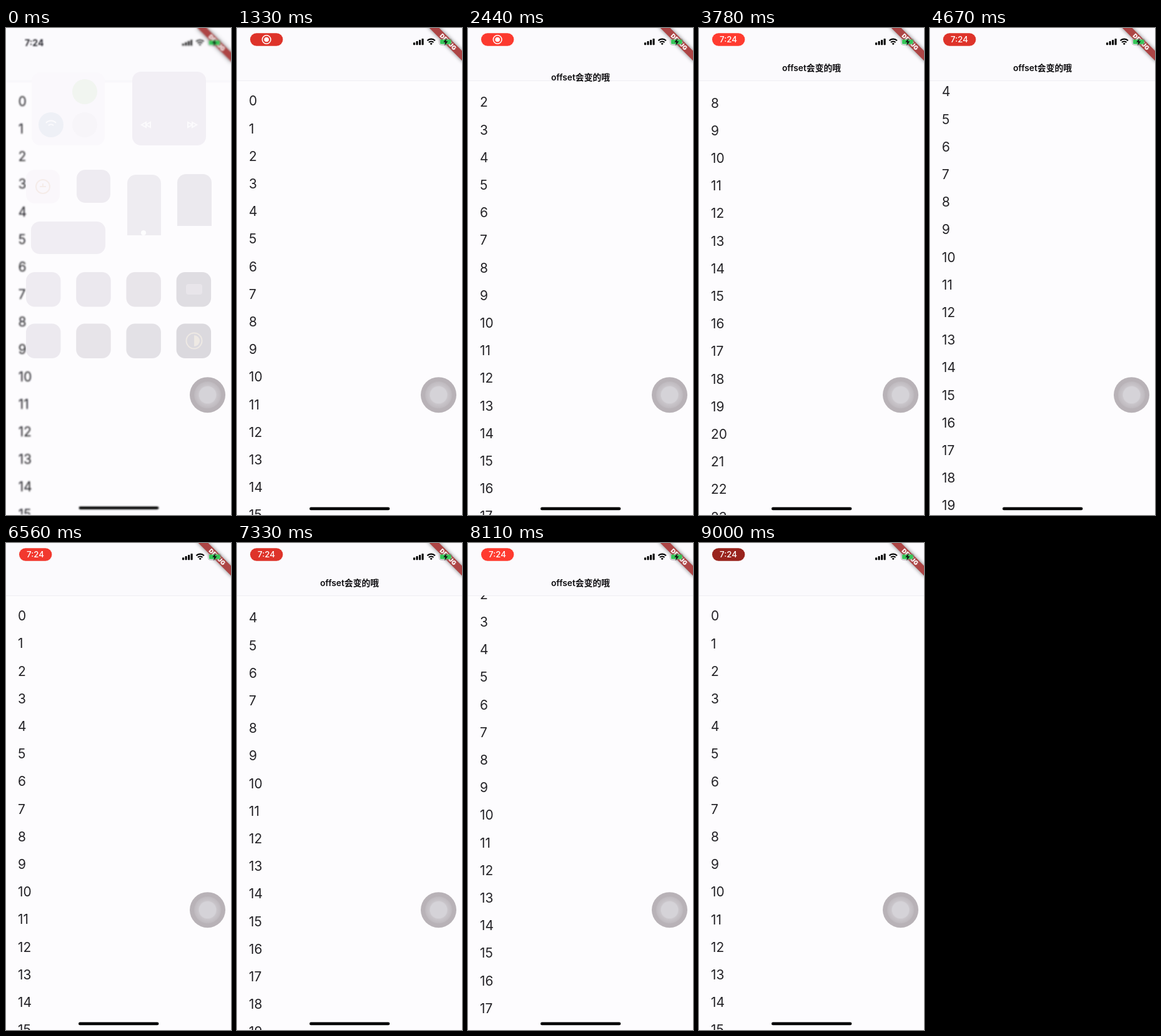
Recreate the animation shown at these times as an HTML page. Size 360 px wide and 780 px high, loop 9060 ms.

```html
<!DOCTYPE html>
<html lang="zh">
<head>
<meta charset="utf-8">
<title>Scroll offset</title>
<style>
html, body { margin: 0; width: 100%; height: 100%; overflow: hidden; background: #fdfcfe; }
svg { display: block; width: 100vw; height: 100vh; }
text { font-family: Inter, "Noto Sans CJK SC", "Noto Sans CJK", sans-serif; }
.mid { text-anchor: middle; }
.row { font-size: 21px; fill: #242327; }
</style>
</head>
<body>
<svg viewBox="0 0 360 780">
  <defs>
    <clipPath id="listClip"><rect y="84" width="360" height="696"/></clipPath>
    <clipPath id="barClip"><rect width="360" height="86"/></clipPath>
    <filter id="blur" x="0" y="0" width="1" height="1"><feGaussianBlur id="blurAmount" stdDeviation="0"/></filter>
    <filter id="shadow" x="-30%" y="-150%" width="160%" height="400%"><feGaussianBlur stdDeviation="3.4"/></filter>
    <radialGradient id="knob">
      <stop offset=".46" stop-color="#d5d3d8"/>
      <stop offset=".52" stop-color="#c9c5ca"/>
      <stop offset=".72" stop-color="#c0bbc0"/>
      <stop offset=".78" stop-color="#b8b2b7"/>
    </radialGradient>
  </defs>
  <rect width="360" height="780" fill="#fdfcfe"/>
  <g id="app">
    <rect width="360" height="84" fill="#fbfafd"/>
    <path d="M0 84.5H360" stroke="#efedf3"/>
    <g clip-path="url(#listClip)"><g id="list"></g></g>
    <g clip-path="url(#barClip)">
      <text id="title" class="mid" x="180" font-size="13.8" font-weight="600" fill="#0c0b0e">offset会变的哦</text>
    </g>
    <g transform="translate(360 0) rotate(45)">
      <rect x="-40" y="25.8" width="80" height="11.1" fill="#000" opacity=".5" filter="url(#shadow)"/>
      <rect x="-40" y="25.8" width="80" height="11.1" fill="#ad4545"/>
      <text class="mid" y="34.8" font-size="9.4" font-weight="900" fill="#fff">DEBUG</text>
    </g>
    <g id="signal"></g>
    <g fill="none" stroke="#000" stroke-width="2.3">
      <path d="M304.5 20.2a8.8 8.8 0 0 1 12.4 0M307 23a5.4 5.4 0 0 1 7.4 0"/>
      <path d="M310.7 27.2l-2-2.2a3 3 0 0 1 4 0z" fill="#000" stroke="none"/>
    </g>
    <g>
      <rect x="323.6" y="17.2" width="20.4" height="10" rx="3" fill="none" stroke="#8c8c8c" stroke-opacity=".6"/>
      <rect x="325" y="18.6" width="17.6" height="7.2" rx="1.6" fill="#35c759"/>
      <path d="M335.2 16.2l-5 6.6h3l-1 5.4 5.2-7h-3.2z" fill="#111"/>
    </g>
    <rect x="116" y="767.6" width="128.4" height="4.6" rx="2.3"/>
  </g>
  <text id="clock" class="mid" x="45.2" y="28.6" font-size="14" font-weight="700" fill="#2b2a30">7:24</text>
  <g id="pill">
    <rect id="pillBg" x="21" y="8.3" width="52.4" height="20.4" rx="10.2"/>
    <g id="rec">
      <circle cx="47.2" cy="18.5" r="6.8" fill="none" stroke="#fff" stroke-width="1.6"/>
      <circle cx="47.2" cy="18.5" r="3.8" fill="#fff"/>
    </g>
    <text id="pillTime" class="mid" x="47" y="23.2" font-size="13.3" font-weight="500" fill="#fff">7:24</text>
  </g>
  <g id="panel"></g>
  <circle cx="322.5" cy="587.7" r="28.5" fill="url(#knob)"/>
</svg>
<script>
const LOOP = 9060, ROW = 44.2;
const $ = id => document.getElementById(id);
const clamp = v => Math.max(0, Math.min(1, v));
const ease = (t, a, b) => { const u = clamp((t - a) / (b - a)); return u * u * (3 - 2 * u); };

function add(parent, tag, attrs, text) {
  const el = document.createElementNS('http://www.w3.org/2000/svg', tag);
  for (const k in attrs) el.setAttribute(k, attrs[k]);
  if (text !== undefined) el.textContent = text;
  return parent.appendChild(el);
}
const set = (id, name, v) => $(id).setAttribute(name, v);

for (let n = 0; n < 28; n++) add($('list'), 'text', { class: 'row', x: 19, y: 124.4 + n * ROW }, n);
for (let i = 0; i < 4; i++) {
  const h = 4 + i * 2.1;
  add($('signal'), 'rect', { x: 282 + i * 4.5, y: 27.2 - h, width: 3.1, height: h, rx: 0.8 });
}

// Control centre, already nearly gone when the loop begins
const panel = $('panel');
const tile = (x, y, w, h, fill, rx = 14) => add(panel, 'rect', { x, y, width: w, height: h, rx, fill });
const dot = (cx, cy, r, fill) => add(panel, 'circle', { cx, cy, r, fill });
const ring = (cx, cy, r, stroke) => add(panel, 'circle', { cx, cy, r, stroke, fill: 'none', 'stroke-width': 2 });
const shape = (d, fill) => add(panel, 'path', { d, fill });
const glyph = (d, stroke = '#fcfbfd') => add(panel, 'path', { d, stroke, fill: 'none', 'stroke-width': 2 });
tile(41, 71, 117, 117, '#faf8fc');
dot(126, 102, 20, '#f1f5f0');
dot(72, 155, 20, '#eef0f6');
dot(126, 155, 20, '#f7f5f9');
glyph('M64 152a11 11 0 0 1 16 0M68 156a6 6 0 0 1 8 0');
tile(202, 70, 118, 118, '#f2eff5');
glyph('M217 155l7 -4v8zM224 155l7 -4v8zM291 151l7 4 -7 4zM298 151l7 4 -7 4z');
tile(32, 227, 54, 54, '#faf7fb');
ring(59, 254, 11, '#f5ece9');
glyph('M54 254h10M59 249v5', '#f5ece9');
tile(113, 227, 54, 53, '#eeebf1');
shape('M194 332V249a14 14 0 0 1 14 -14h26a14 14 0 0 1 14 14v83z', '#eeecf1');
shape('M274 317V248a14 14 0 0 1 14 -14h27a14 14 0 0 1 14 14v69z', '#ebe9ee');
dot(220, 328, 4, '#fdfdfe');
tile(40, 310, 119, 52, '#f0edf3');
['#eeebf1', '#ebe8ee', '#e8e5ea', '#dfdde2', '#ece9ef', '#e7e4e9', '#e3e1e6', '#dbd9de'].forEach((c, i) =>
  tile(32 + (i % 4) * 80.2, i < 4 ? 391 : 473.5, 55.5, 55.5, c));
tile(288, 410, 26, 17, '#e8e5ea', 4);
ring(301, 501, 12.5, '#eee9e4');
shape('M301 492a9 9 0 0 1 0 18z', '#eee9e4');

// Scroll position: time, offset
const keys = [[0, 0], [1850, 0], [2440, 86.2], [3250, 325], [3780, 350.4], [4050, 346], [4670, 192],
  [5420, -32], [5830, -7], [6200, 0], [6550, 0], [7100, 162], [7330, 173.8], [7700, 173.8],
  [8100, 125], [8600, -12], [8970, 0], [LOOP, 0]];
const slopes = keys.slice(1).map((k, i) => (k[1] - keys[i][1]) / (k[0] - keys[i][0]));
const tangent = i => {
  const a = slopes[i - 1] || 0, b = slopes[i] || 0;
  return a * b > 0 ? 2 * a * b / (a + b) : 0;
};
function scrollAt(t) {
  let i = 0;
  while (i < keys.length - 2 && t >= keys[i + 1][0]) i++;
  const [t0, y0] = keys[i], [t1, y1] = keys[i + 1], d = t1 - t0, u = (t - t0) / d, v = 1 - u;
  return y0 * (1 + 2 * u) * v * v + y1 * (3 - 2 * u) * u * u
    + d * (tangent(i) * u * v * v - tangent(i + 1) * u * u * v);
}

function draw(t) {
  const y = scrollAt(t);
  set('list', 'transform', `translate(0 ${-y})`);
  set('title', 'y', 69 + Math.max(0, 101 - y));

  const open = 1 - ease(t, 60, 420);
  const scale = 1 - 0.0035 * open;
  set('app', 'transform', `translate(180 400) scale(${scale}) translate(-180 -400)`);
  set('blurAmount', 'stdDeviation', 0.9 * open);
  for (const id of ['app', 'clock']) {
    if (open > 0.02) set(id, 'filter', 'url(#blur)');
    else $(id).removeAttribute('filter');
  }
  set('panel', 'opacity', open);

  const shown = ease(t, 450, 750);
  set('clock', 'opacity', 1 - shown);
  set('pill', 'opacity', shown);
  const time = ease(t, 2950, 3200);
  set('rec', 'opacity', 1 - time);
  set('pillTime', 'opacity', time);
  const dim = Math.pow((1 + Math.cos((t - 9000) * Math.PI / 1000)) / 2, 4);
  set('pillBg', 'fill', `rgb(${255 - 102 * dim},${59 - 24 * dim},${48 - 19 * dim})`);
}

const start = performance.now();
function tick() {
  draw((performance.now() - start) % LOOP);
  requestAnimationFrame(tick);
}
draw(0);
requestAnimationFrame(tick);
</script>
</body>
</html>
```
